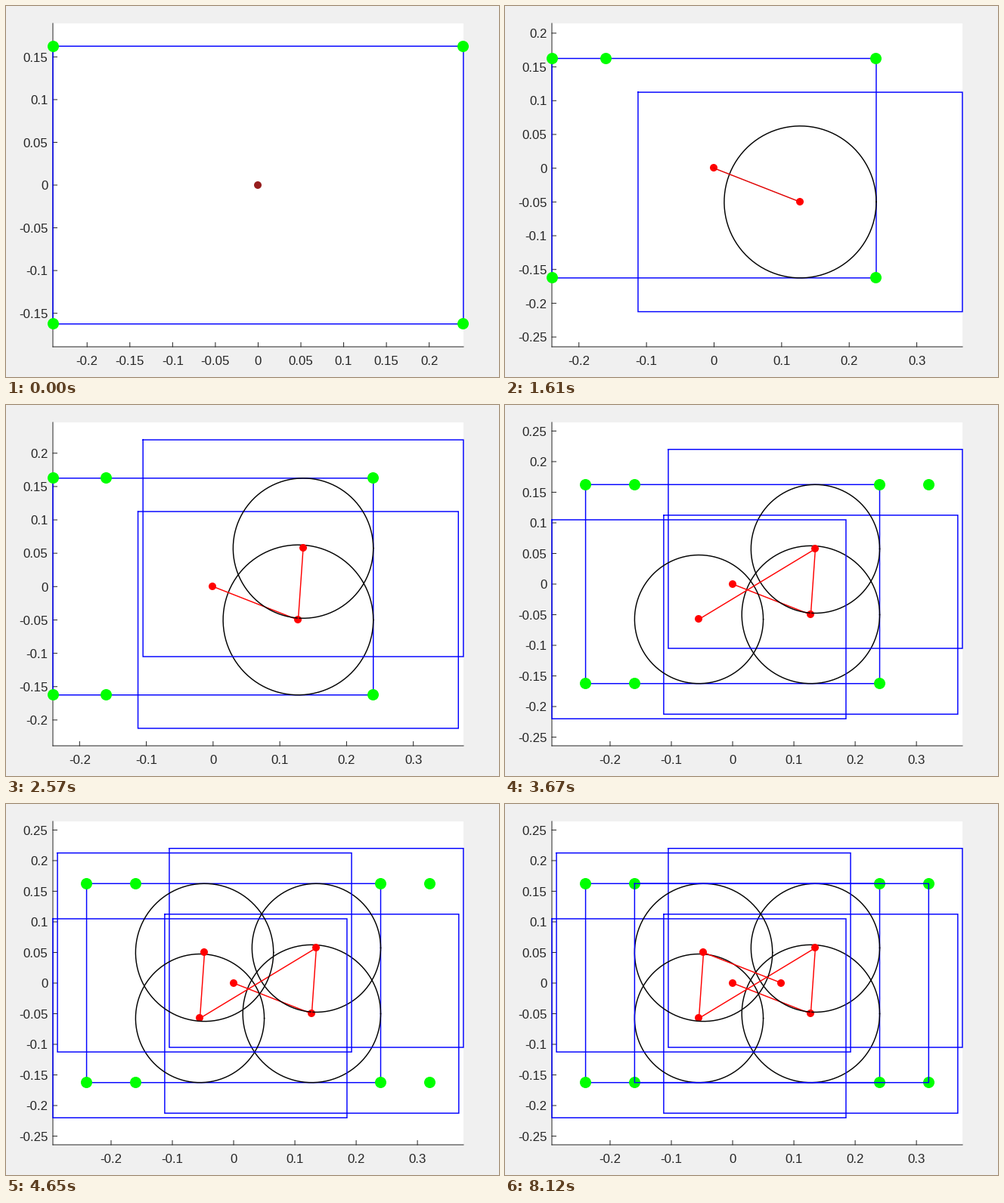
Animation, 652 px wide and 491 px high, one loop 9780 ms. Source, as a matplotlib script:

```python
import numpy as np
import matplotlib.pyplot as plt
from matplotlib.animation import FuncAnimation

W, H, DPI = 652, 491, 100
LEFT, RIGHT, TOP, BOTTOM = 62, 604.9, 23, 451
LOOP, STEP = 9780, 20
STARTS = [0, 1610, 2570, 3670, 4650, 5640]

HALF_W, HALF_H = 0.24, 0.1625
CENTERS = [(0, 0), (0.1275, -0.05), (0.135, 0.0575),
           (-0.055, -0.0575), (-0.0475, 0.05), (0.08, 0)]
RADII = [0, 0.1125, 0.105, 0.105, 0.1125, 0]
EXTRA = [None, (-0.16, HALF_H), (-0.16, -HALF_H),
         (0.32, HALF_H), (0.32, -HALF_H), None]
CORNERS = [(-HALF_W, HALF_H), (HALF_W, HALF_H),
           (HALF_W, -HALF_H), (-HALF_W, -HALF_H)]
INK = "#262626"

plt.rcParams["font.family"] = "Liberation Sans"


def pt(px):
    return px * 72 / DPI


fig = plt.figure(figsize=(W / DPI, H / DPI), dpi=DPI, facecolor="#f0f0f0")
ax = fig.add_axes([0, 0, 1, 1])
ax.set_xlim(0, W)
ax.set_ylim(H, 0)
ax.axis("off")
ax.fill([62, 605, 605, 62], [TOP, TOP, BOTTOM, BOTTOM], color="white", lw=0, zorder=0)


class Scene:
    """The drawing after a given number of moves, with its own axis limits."""

    def __init__(self, moves):
        self.artists = []
        pts = np.array(CENTERS[:moves + 1])
        x0, x1 = pts[:, 0].min() - HALF_W, pts[:, 0].max() + HALF_W
        self.x0 = x0
        self.ymid = (pts[:, 1].min() + pts[:, 1].max()) / 2
        self.scale = (RIGHT - LEFT) / (x1 - x0)
        self.draw_axes(x1, 0.1 if moves else 0.05)
        for i in range(moves + 1):
            self.draw_move(i, moves)
        self.show(False)

    def px(self, x):
        return LEFT + (np.asarray(x) - self.x0) * self.scale

    def py(self, y):
        return (TOP + BOTTOM) / 2 - (np.asarray(y) - self.ymid) * self.scale

    def layer(self):
        return len(self.artists) + 1

    def stroke(self, x, y, color, width):
        self.artists += ax.plot(x, y, color=color, lw=pt(width), snap=False,
                                solid_joinstyle="miter", zorder=self.layer())

    def curve(self, x, y, color):
        self.stroke(self.px(x), self.py(y), color, 1.45)

    def dots(self, pts, color, size):
        # Dots sit on whole pixels: odd sizes on centres, even ones on edges.
        shift = size % 2 / 2
        for x, y in pts:
            center = (np.floor(self.px(x)) + shift, np.floor(self.py(y)) + shift)
            dot = plt.Circle(center, size / 2, color=color, lw=0, zorder=self.layer())
            self.artists.append(ax.add_patch(dot))

    def label(self, x, y, value, align):
        self.artists.append(ax.text(x, y, f"{value:g}", color=INK, ha=align,
                                    va="baseline", fontsize=pt(16.7),
                                    zorder=self.layer()))

    def draw_axes(self, x1, xstep):
        self.stroke([62, 62], [TOP, BOTTOM], INK, 1)
        self.stroke([62, 605], [BOTTOM, BOTTOM], INK, 1)
        for k in range(-10, 11):
            v = round(k * xstep, 2)
            if self.x0 < v < x1:
                x = self.px(v)
                self.stroke([x, x], [BOTTOM - 5.5, BOTTOM], INK, 1)
                self.label(x, 475, v, "center")
            v = round(k * 0.05, 2)
            y = self.py(v)
            if TOP < y < BOTTOM:
                self.stroke([62, 67.5], [y, y], INK, 1)
                self.label(55.5, y + 6.2, v, "right")

    def draw_move(self, i, moves):
        cx, cy = CENTERS[i]
        rect = np.array(CORNERS + CORNERS[:1]) + (cx, cy)
        self.curve(rect[:, 0], rect[:, 1], "#0000ff")
        if i == 0:
            self.dots(CORNERS, "#00ff00", 15)
        if RADII[i]:
            a = np.linspace(0, 2 * np.pi, 200)
            self.curve(cx + RADII[i] * np.cos(a), cy + RADII[i] * np.sin(a), "black")
        if i:
            bx, by = CENTERS[i - 1]
            self.curve([bx, cx], [by, cy], "#ff0000" if moves > 1 else "#e00000")
        self.dots([CENTERS[i]], "#ff0000" if moves else "#961e1e", 10)
        if EXTRA[i]:
            self.dots([EXTRA[i]], "#00ff00", 15)

    def show(self, on):
        for artist in self.artists:
            artist.set_visible(on)


scenes = [Scene(n) for n in range(len(CENTERS))]


def update(frame):
    t = frame * STEP + STEP / 2
    current = sum(t >= s for s in STARTS) - 1
    for n, scene in enumerate(scenes):
        scene.show(n == current)
    return []


anim = FuncAnimation(fig, update, frames=LOOP // STEP, interval=STEP,
                     init_func=lambda: update(0), repeat=True, repeat_delay=0)
plt.show()
```
